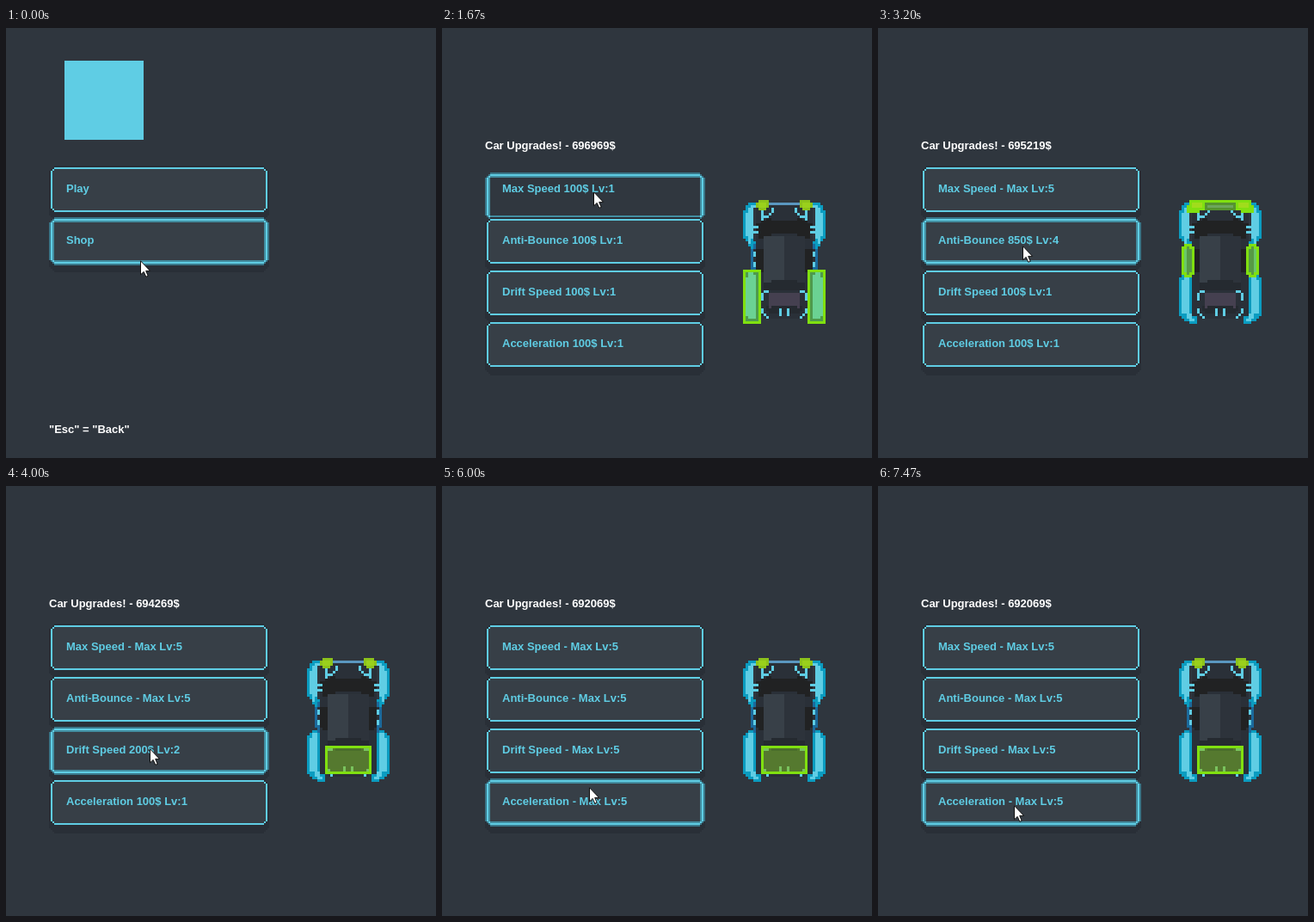
Recreate the animation shown at these times as an HTML page. Size 500 px wide and 500 px high, loop 7600 ms.

```html
<!DOCTYPE html>
<html lang="en">
<head>
<meta charset="utf-8">
<title>Car upgrades menu</title>
<style>
html, body { margin: 0; width: 100%; height: 100%; overflow: hidden; background: #2f363e; }
svg { display: block; width: 500px; height: 500px; }
text { font: bold 13px "Liberation Sans", Arial, sans-serif; fill: #5fcde4; white-space: pre; }
.white { fill: #fff; }
</style>
</head>
<body>
<svg id="stage" viewBox="0 0 500 500" xmlns="http://www.w3.org/2000/svg"></svg>
<script>
const LOOP = 7600, TICKS = 114;
const CYAN = '#5fcde4', TEAL = '#0b9cc0', LIME = '#80e010', BLACK = '#212223';
const SHADE = '#292f37', FACE = '#373f47', FACE_DOWN = '#30373f';
const stage = document.getElementById('stage');

// Upgrade names, price rise per level, and the ticks at which each one is bought
const upgrades = [
  { name: 'Max Speed', rise: 50, buys: [26, 29, 32, 36] },
  { name: 'Anti-Bounce', rise: 250, buys: [44, 46, 48, 51] },
  { name: 'Drift Speed', rise: 100, buys: [60, 62, 65, 68] },
  { name: 'Acceleration', rise: 150, buys: [77, 80, 82, 84] }
];
const presses = [6, 25, 28, 31, 35, 43, 45, 50, 81];
const SHOP_OPENS = 7;

// Pointer path: tick, x, y
const path = [
  [0, 156, 270], [1, 161, 262], [2, 161, 262], [3, 166, 253], [12, 166, 253],
  [16, 176, 190], [36, 176, 190], [37, 169, 213], [40, 168, 253], [52, 168, 253],
  [55, 167, 305], [69, 167, 305], [71, 167, 351], [73, 167, 377], [89, 167, 377],
  [90, 171, 350], [101, 176, 183], [112, 158, 371], [114, 158, 371]
];

function pointer(tick) {
  const i = path.findIndex(k => k[0] > tick);
  const [t0, x0, y0] = path[i - 1], [t1, x1, y1] = path[i];
  const k = (tick - t0) / (t1 - t0);
  return [Math.round(x0 + (x1 - x0) * k), Math.round(y0 + (y1 - y0) * k)];
}

const shape = (fill, d, extra = '') => `<path fill="${fill}" d="${d}" ${extra}/>`;
const label = (x, y, str, cls = '') => `<text x="${x}" y="${y}" class="${cls}">${str}</text>`;

// Box inset from the 256 x 56 button area; the corner staircase shrinks with the inset
function plate(y, inset, fill) {
  const x = 50 + inset, w = 256 - 2 * inset, h = 56 - 2 * inset;
  const steps = 3 - inset / 2, cut = 2 * steps;
  const stair = s => s.repeat(steps);
  return shape(fill, `M${x + cut} ${y + inset}h${w - 2 * cut}` + stair('v2h2') + `v${h - 2 * cut}` +
    stair('h-2v2') + `h${2 * cut - w}` + stair('v-2h-2') + `v${2 * cut - h}` + stair('h2v-2') + 'z');
}

function button(i, str, hover, pressed) {
  const top = 160 + 60 * i, y = top + (pressed ? 8 : 0);
  const layers = hover
    ? ['#3a7789', CYAN, '#438ea1', pressed ? FACE_DOWN : FACE]
    : [SHADE, CYAN, FACE];
  return plate(top + 8, 0, SHADE) + layers.map((c, n) => plate(y, 2 * n, c)).join('') +
    label(70, top + 31, str);
}

// The car is drawn on a 32 x 48 grid; both sides share one half
const mirror = s => s + `<g transform="translate(32 0) scale(-1 1)">${s}</g>`;

const carBase =
  mirror(shape('#2a3038', 'M5 1H16V46H8V45H5V28H4V18H5Z')) +
  shape('#384048', 'M8 14H16V31H11V32H8Z') +
  shape('#2d333b', 'M16 14H24V32H21V31H16Z') +
  mirror(
    shape(TEAL, 'M2 2V1H6V3H4V16H5V19H3V18H2V16H1V15H0V4H1V2ZM2 28H5V30H5V45H7V48H4V47H2V46H1V45H0V30H1V29H2Z') +
    shape(CYAN, 'M2 3H3V2H5V3H4V15H3V17H2V14H1V5H2ZM1 31H2V29H4V44H5V46H6V47H4V46H3V44H1Z') +
    shape('#1b6a9c', 'M3 19h1v8h-1zM4 17h1v2h-1zM4 26h1v3h-1z') +
    shape('#5a97c0', 'M10 1H16V2H10Z') +
    shape(BLACK, 'M7 8H9V7H11V8H16V13H11V14H8V15H6V12H5V9H7ZM5 19H8V28H6V27H5Z') +
    shape('#252a30', 'M8 32H11V31H16V35H9V36H8ZM9 41H16V44H10V43H9Z') +
    shape('#454050', 'M10 36H16V41H11V42H10Z') +
    shape(CYAN, 'M7 4h1v4h-1zM8 6h2v1h-2zM10 5h1v1h-1zM11 3h1v2h-1zM4 10h2v1h-2zM4 12h2v1h-2zM4 20h1v2h-1zM4 24h1v2h-1z') +
    shape(CYAN, 'M8 35h2v1h-2zM7 36h1v3h-1zM7 42h1v2h-1zM8 44h1v1h-1zM9 45h1v1h-1zM14 42h1v3h-1z') +
    shape('#8cc21b', 'M6 0H10V3H9V4H6V3H5V1H6Z') +
    shape('#9ad01c', 'M6 1h3v2h-3z')
  );

const lit = (d, fill) => shape(fill, d, `stroke="${LIME}"`);

const wheels = mirror(
  lit('M.5 28.5V27.5H6.5V47.5H.5Z', '#4e9a4c') +
  shape('#6bd293', 'M2 28H4V29H5V46H2V45H1V30H2Z')
);
const bumpers = mirror(
  shape(LIME, 'M4 0H16V4H8V5H3V2H4Z') +
  shape('#a1dc1c', 'M5 1h4v2h-4z') +
  shape('#55932f', 'M10 1H16V4H10Z') +
  shape('#6da65c', 'M11 2H16V3H11Z') +
  shape(LIME, 'M2 17H5V18H6V29H5V30H2V29H1V18H2Z') +
  shape('#579a45', 'M3 18H4V19H5V28H4V29H3Z') +
  shape('#6bc76a', 'M2 19h1v9h-1z')
);
const boot =
  lit('M7.5 34.5H24.5V44.5H7.5Z', '#55792f') +
  mirror(
    shape('#4a6d2c', 'M11 35H16V36H11Z') +
    shape('#79c35e', 'M8 35h2v1h-2zM14 42h1v2h-1zM8 43h1v1h-1z')
  );
const glow = [wheels, bumpers, boot, boot];

const car = active =>
  `<g transform="translate(350 200) scale(3)">${carBase}${glow[active] || ''}</g>`;

const arrow = (x, y) =>
  `<path transform="translate(${x} ${y})" shape-rendering="auto" fill="#fff" stroke="#111" stroke-width="1"
    d="M.5 .8V16.8L4.2 13.4L6.8 19.3L9.2 18.3L6.7 12.4H11.6Z"/>`;

function mainMenu(hover, pressed) {
  return `<rect x="68" y="38" width="92" height="92" fill="${CYAN}"/>` +
    ['Play', 'Shop'].map((s, i) => button(i, s, hover === i, hover === i && pressed)).join('') +
    label(50, 471, '"Esc" = "Back"', 'white');
}

function shopMenu(tick, hover, pressed) {
  let cash = 696969;
  const rows = upgrades.map((u, i) => {
    const bought = u.buys.filter(b => b <= tick).length;
    for (let n = 0; n < bought; n++) cash -= 100 + u.rise * n;
    const price = bought < 4 ? `${100 + u.rise * bought}$` : '- Max';
    return button(i, `${u.name} ${price} Lv:${bought + 1}`, hover === i, hover === i && pressed);
  });
  return label(50, 141, `Car Upgrades! - ${cash}$`, 'white') + rows.join('') + car(hover);
}

function draw(tick) {
  const [x, y] = pointer(tick);
  const row = Math.floor((y - 162) / 60);
  const hover = y - 162 - 60 * row <= 52 ? row : -1;
  const pressed = presses.includes(tick);
  const screen = tick < SHOP_OPENS ? mainMenu(hover, pressed) : shopMenu(tick, hover, pressed);
  stage.innerHTML = `<rect width="500" height="500" fill="#2f363e"/>` +
    `<g shape-rendering="crispEdges">${screen}</g>` + arrow(x, y);
}

const start = performance.now();
let shown = -1;
function loop(now) {
  const t = Math.max(0, now - start) % LOOP;
  const tick = Math.min(TICKS - 1, Math.floor(t / LOOP * TICKS));
  if (tick !== shown) draw(shown = tick);
  requestAnimationFrame(loop);
}
loop(start);
</script>
</body>
</html>
```
